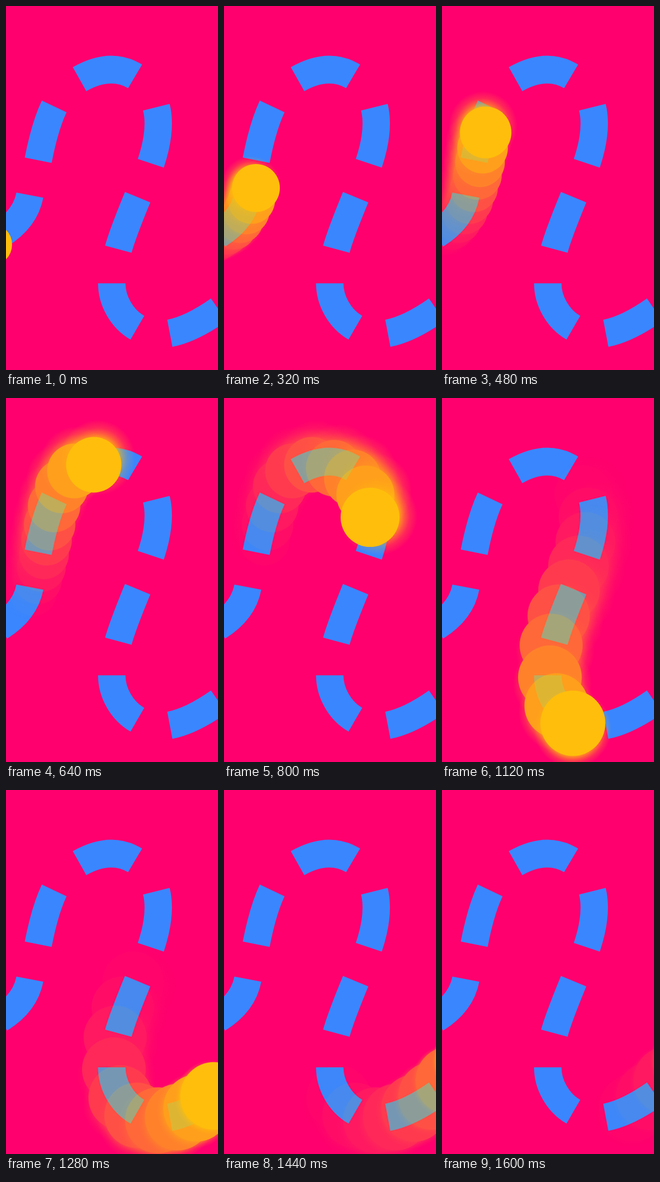
These frames come from a looping animation (418 by 714 pixels, 1.64 s). An HTML page with a canvas:

```html
<!DOCTYPE html>
<html lang="en">
<head>
<meta charset="utf-8">
<title>Ball on a dashed path</title>
<style>
  html, body { margin: 0; width: 100%; height: 100%; overflow: hidden; background: #ff006e; }
  svg, canvas { position: absolute; left: 0; top: 0; width: 418px; height: 714px; }
</style>
</head>
<body>
<svg viewBox="0 0 418 714" fill="none" stroke="#3a86ff" stroke-width="54">
  <path d="M47 371Q38 418 -12 449"/>
  <path d="M63.5 302.5Q76.5 236 95 197"/>
  <path d="M145 143.5Q206 109 254.5 138"/>
  <path d="M296.5 198.5Q307.5 243 285.5 308.5"/>
  <path d="M259.5 375Q229 449 221.5 477"/>
  <path d="M208.5 544C208.5 578 228 613 259 631"/>
  <path d="M323 642Q365 634 419.5 596"/>
</svg>
<canvas width="418" height="714"></canvas>
<script>
const ctx = document.querySelector('canvas').getContext('2d');
const LOOP = 1640, TICK = 40, STEP = 160, ECHOES = 10;

// position and velocity of the ball every STEP ms
const poses = [
  [-29, 468, 46, -30],
  [20, 434, 54, -45],
  [63, 357, 32, -100],
  [86, 248, 28, -130],
  [173, 131, 185, 0],
  [288, 234, 0, 200],
  [230, 427, -80, 205],
  [258, 638, 170, 80],
  [410, 600, 130, -100],
  [560, 450, 150, -150]
];
const END = (poses.length - 1) * STEP;

const hermite = (a, va, b, vb, u) =>
  a + u * (va + u * (3 * (b - a) - 2 * va - vb + u * (2 * (a - b) + va + vb)));

function ballAt(t) {
  const i = Math.min(Math.floor(t / STEP), poses.length - 2);
  const p = poses[i], q = poses[i + 1], u = t / STEP - i;
  return {
    x: hermite(p[0], p[2], q[0], q[2], u),
    y: hermite(p[1], p[3], q[1], q[3], u),
    r: 41 + 27 * Math.sin(Math.PI / 2 * (t / 1600) ** 1.2)
  };
}

const yellow = a => `rgba(255,190,11,${a})`;

// Blends a disc towards the given opacity instead of piling it up
function stamp(x, y, r, fill, alpha) {
  ctx.fillStyle = fill;
  ctx.beginPath();
  ctx.arc(x, y, r, 0, 2 * Math.PI);
  ctx.globalAlpha = 1;
  ctx.globalCompositeOperation = 'destination-out';
  ctx.fill();
  ctx.globalAlpha = alpha;
  ctx.globalCompositeOperation = 'lighter';
  ctx.fill();
}

// Soft shadow that circles the ball
function shadow(t, { x, y, r }, alpha) {
  const size = 36 * Math.sin(Math.PI * t / END);
  const angle = (t - 830) * 0.32 * Math.PI / 180;
  const sx = x + 0.45 * size * Math.cos(angle);
  const sy = y + 0.45 * size * Math.sin(angle);
  const outer = r + 0.55 * size;
  const g = ctx.createRadialGradient(sx, sy, r - 0.55 * size, sx, sy, outer);
  [[0, 0.9], [0.35, 0.45], [0.6, 0.2], [1, 0]]
    .forEach(([at, a]) => g.addColorStop(at, yellow(a)));
  stamp(sx, sy, outer, g, alpha);
}

function draw(t) {
  ctx.clearRect(0, 0, 418, 714);
  for (let n = ECHOES - 1; n >= 0; n--) {
    const s = t - n * TICK;
    if (s < 0 || s > END) continue;
    const ball = ballAt(s);
    const alpha = (1 - n / ECHOES) ** 1.7;
    shadow(s, ball, alpha);
    stamp(ball.x, ball.y, ball.r, yellow(1), alpha);
  }
}

function loop() {
  draw(Math.floor(performance.now() % LOOP / TICK) * TICK);
  requestAnimationFrame(loop);
}
loop();
</script>
</body>
</html>
```
